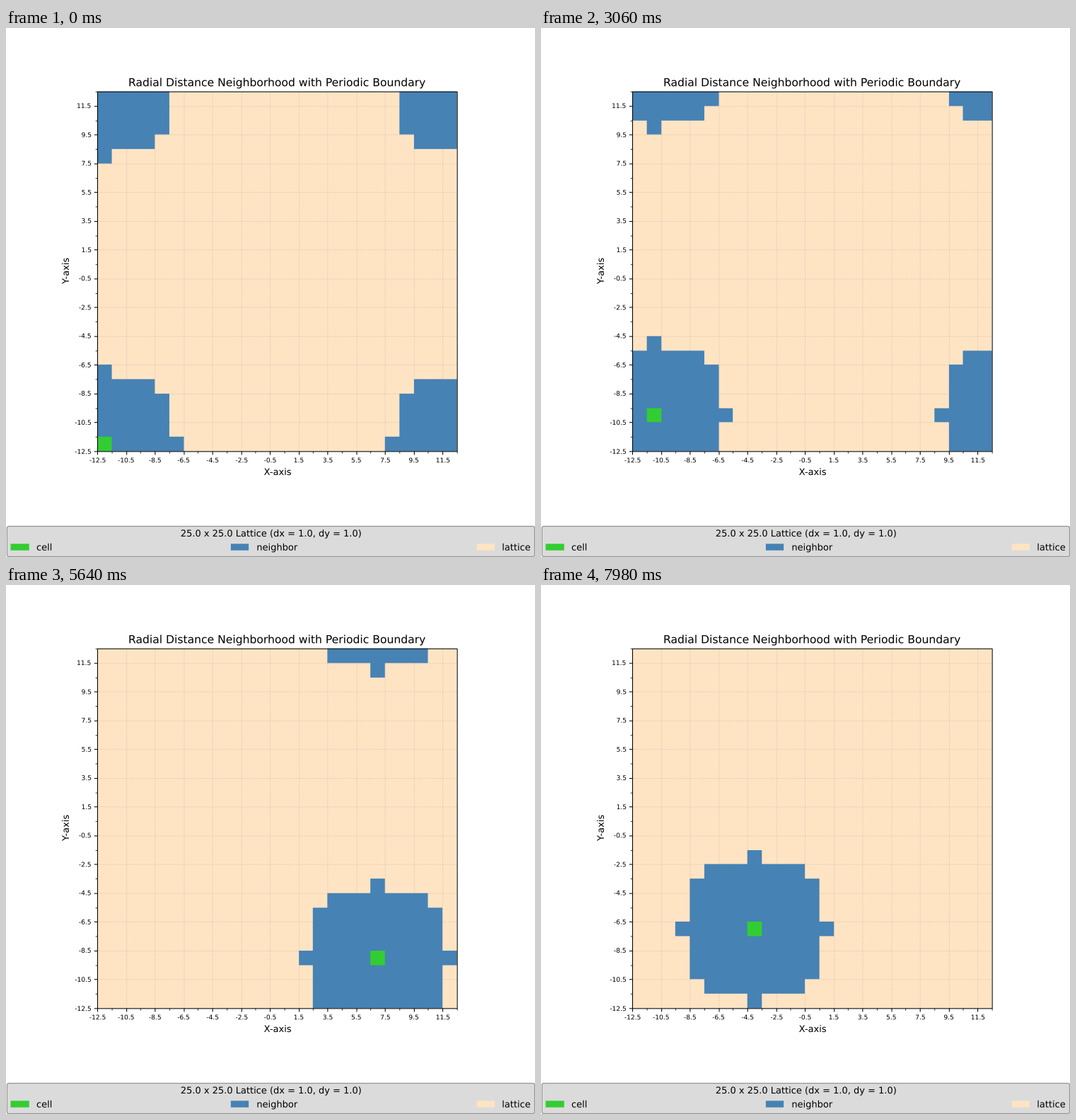
Recreate the animation shown at these times as a matplotlib script. Size 748 px wide and 748 px high, loop 8000 ms.

```python
import numpy as np
import matplotlib.pyplot as plt
from matplotlib.animation import FuncAnimation
from matplotlib.patches import FancyBboxPatch, PathPatch, Rectangle
from matplotlib.path import Path
from matplotlib.textpath import TextPath
from matplotlib.transforms import Affine2D

# Layout unit: 1/100 inch, y pointing down, on an 8 x 8 inch stage.
STAGE_PX, UNITS = 748, 800
PT = 100 / 72
LEFT, RIGHT, TOP, BOTTOM = 138, 682, 96, 640
N, RADIUS = 25, 5
PITCH = (RIGHT - LEFT) / N
STEP_MS, TICK_MS, LOOP_MS = 60, 20, 8000
CELL, NEIGHBOR, LATTICE = "limegreen", "steelblue", "bisque"

plt.rcParams["font.family"] = "DejaVu Sans"
fig = plt.figure(figsize=(8, 8), dpi=STAGE_PX / 8, facecolor="white")
ax = fig.add_axes([0, 0, 1, 1])
ax.set(xlim=(0, UNITS), ylim=(UNITS, 0))
ax.set_autoscale_on(False)
ax.axis("off")

glyphs = []


def whole(v):
    return np.floor(np.asarray(v) + 0.5)


def text(x, y, s, size, align=0.5, upright=False):
    """Add text with its baseline at y (at x if upright); align 0 left to 1 right."""
    path = TextPath((0, 0), s, size=size * PT)
    shift = align * path.get_extents().x1
    place = Affine2D()
    if upright:
        place.rotate_deg(90)
        y += shift
    else:
        x -= shift
    place.scale(1, -1).translate(whole(x), whole(y))
    glyphs.append(place.transform_path(path))


def box(x0, y0, x1, y1, color):
    ax.add_patch(Rectangle((x0, y0), x1 - x0, y1 - y0, color=color, lw=0,
                           snap=False, zorder=1))


def lines(x, y, **style):
    """Vertical lines at x and horizontal lines at y, each given as (values, from, to)."""
    ax.vlines(*x, snap=False, **style)
    ax.hlines(*y, snap=False, **style)


# Plot area: lattice, grid, ticks, frame
major = np.arange(0, N, 2)
minor = major + 1


def line_x(k):
    return whole(LEFT + PITCH * k) + 0.5


def line_y(k):
    return whole(BOTTOM - PITCH * k) + 0.5


L, R, T, B = LEFT + 0.5, RIGHT + 0.5, TOP + 0.5, BOTTOM + 0.5
box(LEFT, TOP, RIGHT, BOTTOM, LATTICE)
lines((line_x(major), B, T), (line_y(major), L, R), colors="gray", alpha=0.35,
      linestyles=":", linewidth=0.8, zorder=2)
for ticks, length, width in ((major, 5, 0.8), (minor, 3, 0.6)):
    lines((line_x(ticks), B, B + length), (line_y(ticks), L - length, L),
          colors="black", linewidth=width, zorder=5)
ax.add_patch(Rectangle((L, T), R - L, B - T, fill=False, ec="black", lw=0.8,
                       snap=False, zorder=6))

for k in major:
    name = f"{k - N / 2:.1f}"
    text(LEFT + PITCH * k, 657, name, 7)
    text(LEFT - 7 * PT, BOTTOM - PITCH * k + 3.5, name, 7, align=1)
text((LEFT + RIGHT) / 2, TOP - 6 * PT,
     "Radial Distance Neighborhood with Periodic Boundary", 12)
text((LEFT + RIGHT) / 2, 676, "X-axis", 10)
text(95, (TOP + BOTTOM) / 2, "Y-axis", 10, upright=True)

# Legend: three entries spread over the full width
EM = 10 * PT
ax.add_patch(FancyBboxPatch((1.5, 753.5), 798, 46, fc="lightgray", ec="gray",
                            boxstyle=f"round,pad=0,rounding_size={0.2 * EM}",
                            lw=1, alpha=0.8, snap=False, zorder=0))
text(UNITS / 2, 769, "25.0 x 25.0 Lattice (dx = 1.0, dy = 1.0)", 10)
entries = [("cell", CELL), ("neighbor", NEIGHBOR), ("lattice", LATTICE)]
widths = [2.8 * EM + TextPath((0, 0), name, size=EM).get_extents().x1
          for name, _ in entries]
x = 0.5 * EM
gap = (UNITS - 2 * x - sum(widths)) / (len(entries) - 1)
for (name, color), width in zip(entries, widths):
    box(whole(x), 780, whole(x + 2 * EM), 790, color)
    text(x + 2.8 * EM, 790, name, 10, align=0)
    x += width + gap

ax.add_patch(PathPatch(Path.make_compound_path(*glyphs), fc="black", lw=0,
                       snap=False, zorder=7))

# Moving cell and its neighborhood
index = np.arange(N)
edge_x = whole(LEFT + PITCH * np.arange(N + 1))
edge_y = whole(BOTTOM - PITCH * np.arange(N + 1))


def wrapped(center):
    """Distance along one periodic axis."""
    d = np.abs(index - center)
    return np.minimum(d, N - d)


def squares(mask):
    """One path holding every lattice square set in the mask."""
    r, c = np.nonzero(mask)
    x0, x1, y0, y1 = edge_x[c], edge_x[c + 1], edge_y[r], edge_y[r + 1]
    corners = np.stack([[x0, x1, x1, x0, x0], [y0, y0, y1, y1, y0]])
    codes = [Path.MOVETO] + [Path.LINETO] * 3 + [Path.CLOSEPOLY]
    return Path(corners.T.reshape(-1, 2), codes * len(r))


def patch(color, zorder):
    return ax.add_patch(PathPatch(Path([(0, 0)]), fc=color, lw=0,
                                  snap=False, zorder=zorder))


neighbors, cell = patch(NEIGHBOR, 3), patch(CELL, 4)


def update(frame):
    row, col = divmod(frame * TICK_MS // STEP_MS, N)
    dist2 = wrapped(row)[:, None] ** 2 + wrapped(col)[None, :] ** 2
    neighbors.set_path(squares(dist2 <= RADIUS ** 2))
    cell.set_path(squares(dist2 == 0))
    return neighbors, cell


anim = FuncAnimation(fig, update, frames=LOOP_MS // TICK_MS, interval=TICK_MS,
                     init_func=lambda: update(0), repeat=True, repeat_delay=0)
plt.show()
```
